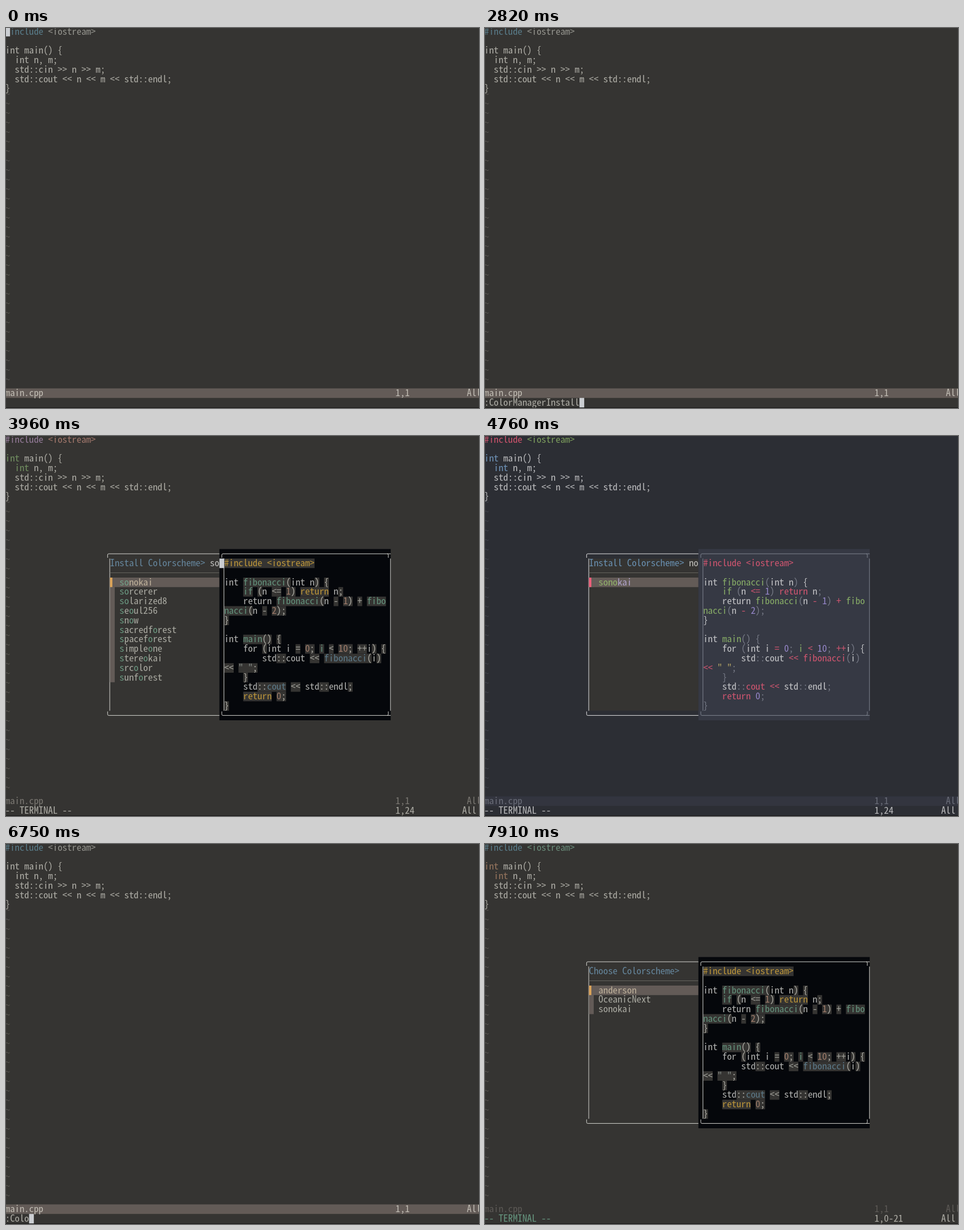
An HTML page with a canvas that plays this animation: 835 by 671 pixels, repeating every 8 s.

```html
<!DOCTYPE html>
<html lang="en">
<head>
<meta charset="utf-8">
<title>Color manager</title>
<style>
  html, body { margin: 0; width: 100%; height: 100%; overflow: hidden; background: #353432; }
  canvas { display: block; }
</style>
</head>
<body>
<canvas id="stage" width="835" height="671"></canvas>
<script>
const ctx = document.getElementById('stage').getContext('2d');
const LOOP = 8000, CELL_W = 8.4, CELL_H = 16.8;
const X = col => col * CELL_W - 1.25;
const Y = row => row * CELL_H - 2;
const FAMILY = '"Noto Sans Mono CJK KR", "Noto Sans Mono CJK JP", "Noto Sans Mono", "DejaVu Sans Mono", monospace';
const INK = 0.82; // softens the glyphs to a light stroke weight

const TERM_BG = '#353432', BAR = '#635b57', CURSOR = '#cbced2';

// Style letters: d directive, t type, s string, k keyword, f function,
// c call, o operator, n number, p punctuation, b brace.
const idle = {
  bg: TERM_BG, fg: '#c9c8bf', d: '#628c9d', s: '#aaa9a2', tilde: '#66635f',
  statusBg: BAR, statusFg: '#d5d2c8'
};
const anderson = {
  ...idle, t: '#ac8468', s: '#75a08a', statusBg: TERM_BG, statusFg: '#65615e', mode: '#72ad91',
  prompt: '#7099b5', pointer: '#dda55a', selected: '#d2c3a9', match: '#75ad91',
  border: '#d6d6d1', pane: {
    bg: '#05070b', fg: '#d8d8d4', border: '#d6d6d1', hl: TERM_BG, k: '#d8a93c', f: '#6da58b',
    c: '#64889b', o: '#bab9b2', n: '#b78c78', p: '#c9c8bf', b: '#c9c8bf', s: '#8d9693'
  }
};
const plain = { ...anderson, d: '#a98bb0', t: '#7fa36b', s: '#b98679', mode: '#c9c8bf', statusFg: '#8a8680' };
const sonokai = {
  bg: '#2c2e34', fg: '#dcdcdd', d: '#f05c79', t: '#7ea9d6', s: '#8fb767', tilde: '#484b55',
  statusBg: '#33353f', statusFg: '#757985', mode: '#dcdcdd',
  prompt: '#74a3cc', pointer: '#f0607c', selected: '#bfb2e2', match: '#9bc46f',
  border: '#e2e2e3', pane: {
    bg: '#363944', fg: '#e2e2e3', border: '#7f8490', k: '#f05c79', f: '#98c56e',
    c: '#f05c79', o: '#f05c79', n: '#ac98e8', p: '#858995', b: '#e2e2e3', s: '#c8b46a'
  }
};

const SOURCE = [
  ['#include <iostream>', 'dddddddd ssssssssss'],
  ['', ''],
  ['int main() {', 'ttt'],
  ['  int n, m;', '  ttt'],
  ['  std::cin >> n >> m;', ''],
  ['  std::cout << n << m << std::endl;', ''],
  ['}', '']
];
const PREVIEW = [
  ['#include <iostream>', 'kkkkkkkkkkkkkkkkkkk'],
  ['', ''],
  ['int fibonacci(int n) {', '    fffffffffp     p b'],
  ['    if (n <= 1) return n;', '    ff p  oo np kkkkkk  p'],
  ['    return fibonacci(n - 1) + fibo', '           fffffffffp  o np o ffff'],
  ['nacci(n - 2);', 'fffffp  o npp'],
  ['}', 'b'],
  ['', ''],
  ['int main() {', '    ffffpp p'],
  ['    for (int i = 0; i < 10; ++i) {', '        p      o np f o nnp oo p b'],
  ['        std::cout << fibonacci(i)', '           pp     oo cccccccccp p'],
  ['<< " ";', 'oo sssp'],
  ['    }', '    p'],
  ['    std::cout << std::endl;', '       ppcccc oo    pp    p'],
  ['    return 0;', '    kkkkkk np'],
  ['}', 'p']
];

const COMMANDS = [
  [0, ''], [990, ':'], [1400, ':C'], [1600, ':Co'], [1760, ':Col'], [1830, ':Colo'],
  [2020, ':ColorManager'], [2560, ':ColorManagerI'], [2820, ':ColorManagerInstall'],
  [4960, ''], [5950, ':'], [6350, ':C'], [6550, ':Co'], [6650, ':Col'], [6750, ':Colo'],
  [6890, ':ColorManager']
];
const MENU = ['ColorManager', 'ColorManagerInstall', 'ColorManagerUninstall'];

const words = text => text.split(' ');
const INSTALL = 'Install Colorscheme> ';
const FINDER = [
  [3150, { ruler: '1,0-1' }],
  [3220, { prompt: INSTALL, query: '', ruler: '1,0-22',
    items: words('gruvbox nord-vim onedark everforest edge iceberg jellybeans molokai papercolor ayu-vim onehalf seoul256 tender sonokai') }],
  [3700, { prompt: INSTALL, query: 's', ruler: '1,23',
    items: words('seoul256 sonokai srcery spacegray sierra sorcerer solarized8 jellybeans everforest base16 nightfox-s snow space') }],
  [3960, { prompt: INSTALL, query: 'so', ruler: '1,24',
    items: words('sonokai sorcerer solarized8 seoul256 snow sacredforest spaceforest simpleone stereokai srcolor sunforest') }],
  [4160, { prompt: INSTALL, query: 'son', ruler: '1,24', items: ['sonokai', 'simpleone'] }],
  [4230, { prompt: INSTALL, query: 'sono', ruler: '1,24', items: ['sonokai'] }],
  [7640, { ruler: '1,0-1' }],
  [7710, { prompt: 'Choose Colorscheme> ', query: '', ruler: '1,0-21',
    items: ['anderson', 'OceanicNext', 'sonokai'] }]
];
const THEMES = [[0, idle], [3150, anderson], [3820, plain], [4020, sonokai], [4960, idle], [7640, anderson]];

const at = (steps, t) => steps.reduce((value, [start, next]) => t >= start ? next : value, null);
const within = (t, ...spans) => spans.some(([from, to]) => t >= from && t < to);

function setFont() {
  const font = size => `300 ${size}px ${FAMILY}`;
  ctx.font = font(CELL_H);
  const width = ctx.measureText('0').width;
  if (Math.abs(width - CELL_W) > 0.1) ctx.font = font(CELL_H * CELL_W / width);
}

function fill(color, col, row, cols = 1, rows = 1) {
  ctx.fillStyle = color;
  ctx.fillRect(X(col), Y(row), cols * CELL_W, rows * CELL_H);
}

function write(text, col, row, color) {
  ctx.fillStyle = color;
  ctx.globalAlpha = INK;
  [...text].forEach((ch, i) => { if (ch !== ' ') ctx.fillText(ch, X(col + i), Y(row) + 13.5); });
  ctx.globalAlpha = 1;
}

function writeCode(lines, col, row, colors) {
  lines.forEach(([text, styles], r) => {
    if (colors.hl) {
      for (const run of styles.matchAll(/\S+/g)) fill(colors.hl, col + run.index, row + r, run[0].length);
    }
    [...text].forEach((ch, i) => write(ch, col + i, row + r, colors[styles[i]] || colors.fg));
  });
}

function tilde(row, color) {
  const y = Y(row) + 1;
  ctx.strokeStyle = color;
  ctx.beginPath();
  ctx.moveTo(0, y);
  ctx.bezierCurveTo(2, y - 3, 4, y + 3, 6.5, y - 0.5);
  ctx.stroke();
}

function border(col, row, cols, rows, color) {
  const last = col + cols - 1;
  const left = X(col) + 4.2, right = X(last) + 4.2;
  const top = Y(row) + 8.4, bottom = Y(row + rows - 1) + 8.2;
  ctx.strokeStyle = color;
  ctx.beginPath();
  for (const [y, turn] of [[top, 1], [bottom, -1]]) {
    ctx.moveTo(left, y + 7 * turn);
    ctx.lineTo(left, y + 2 * turn);
    ctx.quadraticCurveTo(left, y, left + 2, y);
    ctx.lineTo(X(last + 1), y);
    ctx.moveTo(right - 2, y);
    ctx.quadraticCurveTo(right, y, right, y + 2 * turn);
    ctx.lineTo(right, y + 7 * turn);
  }
  for (const c of [col, last]) {
    ctx.moveTo(X(c) + 8, Y(row + 1));
    ctx.lineTo(X(c) + 8, Y(row + rows - 1));
  }
  ctx.stroke();
}

function writeItem(name, row, query, theme, selected) {
  if (selected) {
    fill(BAR, 22, row, 23);
    fill(theme.pointer, 22, row, 0.5);
  }
  let found = 0;
  [...name].forEach((ch, i) => {
    const hit = ch === query[found];
    if (hit) found++;
    write(ch, 24 + i, row, hit ? theme.match : selected ? theme.selected : '#c5c4bb');
  });
}

function drawFinder(t, theme) {
  const { prompt, query, items, ruler } = at(FINDER, t);
  fill(TERM_BG, 22, 13, 23, 16);
  border(21, 12, 25, 18, theme.border);
  let cursor = 22;
  if (prompt) {
    const shown = query.slice(-2);
    write(prompt, 22, 13, theme.prompt);
    write(shown, 22 + prompt.length, 13, '#dcdcd8');
    cursor += prompt.length + shown.length;
    ctx.fillStyle = '#65645f';
    ctx.fillRect(X(22), 241, 193, 1);
    fill(BAR, 22, 15, 1, items.length);
    items.forEach((name, i) => writeItem(name, 15 + i, query, theme, i === 0));
  }

  fill(theme.pane.bg, 45, 12, 36, 18);
  writeCode(PREVIEW, 46, 13, theme.pane);
  border(45, 12, 36, 18, theme.pane.border);
  if (!within(t, [4760, 4960], [7910, LOOP])) fill(CURSOR, cursor, 13);

  write('-- TERMINAL --', 0, 39, theme.mode);
  write(ruler, 82, 39, theme.fg);
  write('All', 96, 39, theme.fg);
}

function drawCommand(t) {
  const command = at(COMMANDS, t);
  write(command, 0, 39, idle.fg);
  if (within(t, [2020, 2560], [6890, 7580])) {
    MENU.forEach((name, i) => {
      fill(i ? BAR : '#c9c8bf', 0, 36 + i, 23);
      write(name, 1, 36 + i, i ? idle.fg : TERM_BG);
    });
  }
  if (!command) fill(CURSOR, 0, 0);
  else fill(CURSOR, within(t, [3090, 3150], [7580, 7640]) ? 0 : command.length, 39);
}

function draw(t) {
  const theme = at(THEMES, t);
  ctx.fillStyle = theme.bg;
  ctx.fillRect(0, 0, 835, 671);
  ctx.lineWidth = 1;
  writeCode(SOURCE, 0, 0, theme);
  for (let row = 7; row < 38; row++) tilde(row, theme.tilde);

  fill(theme.statusBg, 0, 38, 100);
  write('main.cpp', 0, 38, theme.statusFg);
  write('1,1', 82, 38, theme.statusFg);
  write('All', 97, 38, theme.statusFg);

  if (within(t, [3150, 4960], [7640, LOOP])) drawFinder(t, theme);
  else drawCommand(t);

  ctx.fillStyle = '#171716';
  ctx.fillRect(0, 670, 835, 1);
}

setFont();
const start = performance.now();
function tick() {
  draw((performance.now() - start) % LOOP);
  requestAnimationFrame(tick);
}
tick();
</script>
</body>
</html>
```
